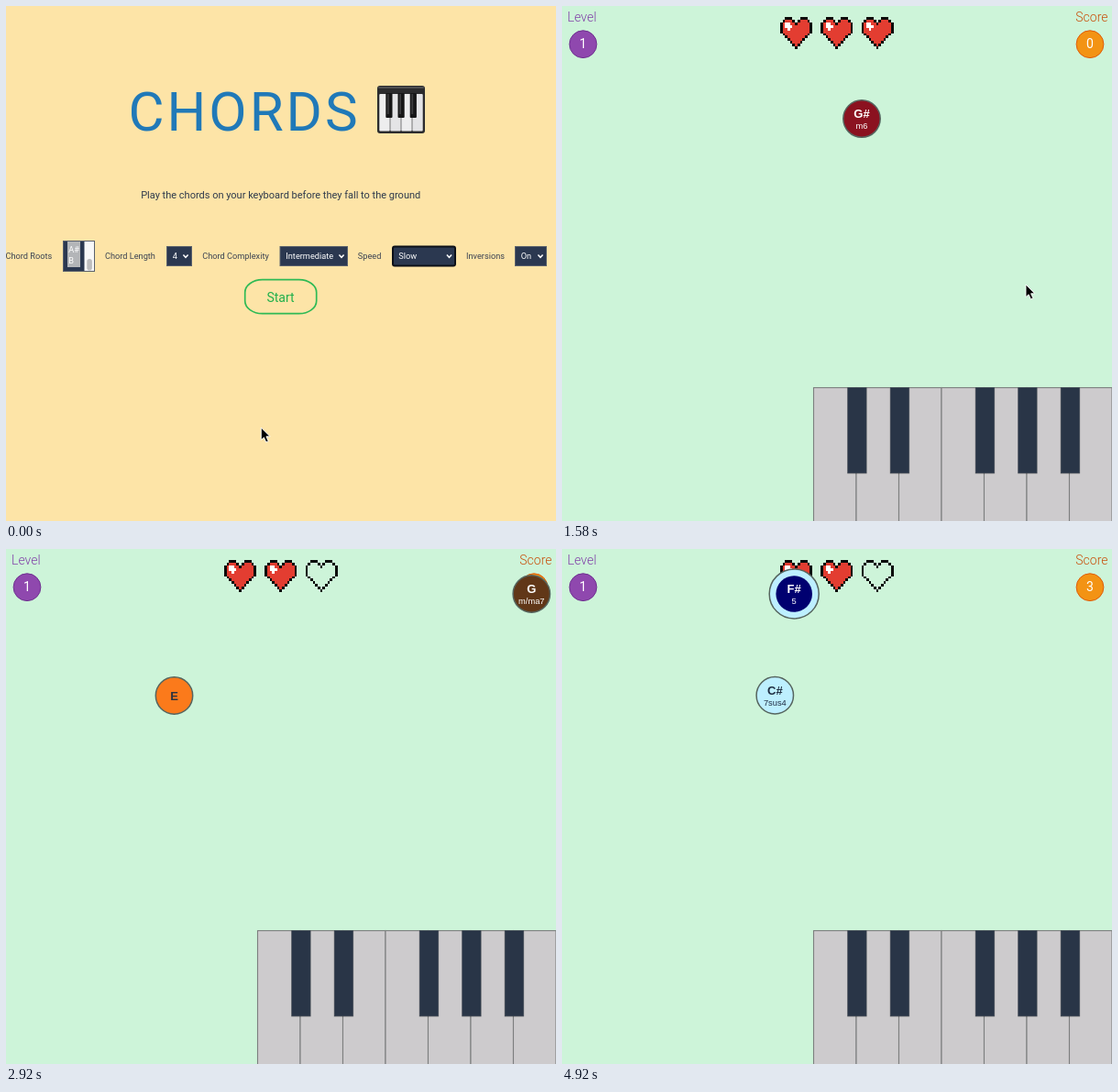
Animation, 600 px wide and 562 px high, one loop 5010 ms. Source, as an HTML page:

```html
<!DOCTYPE html>
<html lang="en">
<head>
<meta charset="utf-8">
<title>Chords</title>
<style>
  html, body { margin: 0; width: 100%; height: 100%; overflow: hidden; background: #cdf4d9; }
  svg { display: block; width: 100vw; height: 100vh; font-family: Roboto, sans-serif; }
  .mid { text-anchor: middle; }
  .label { font-size: 9.2px; fill: #3b4352; }
  .opt { font-size: 9.2px; fill: #fff; }
  .thin { font-weight: 300; }
  .ball { font-family: "Liberation Sans", Arial, sans-serif; text-anchor: middle; }
</style>
</head>
<body>
<svg id="stage" viewBox="0 0 600 562" preserveAspectRatio="none"></svg>
<script>
const LOOP = 5010, FRAME = 1000 / 12, LAST = 59;
const START = 660, SPEED = 0.1103, SPAWN_Y = 21;
const NS = 'http://www.w3.org/2000/svg';
const stage = document.getElementById('stage');

function el(parent, tag, attrs = {}, text) {
  const node = document.createElementNS(NS, tag);
  for (const k in attrs) node.setAttribute(k, attrs[k]);
  if (text !== undefined) node.textContent = text;
  parent.appendChild(node);
  return node;
}
const group = (parent, attrs) => el(parent, 'g', attrs);
const rect = (parent, x, y, width, height, fill, more) =>
  el(parent, 'rect', { x, y, width, height, fill, ...more });
const text = (parent, x, y, str, attrs) => el(parent, 'text', { x, y, ...attrs }, str);
const show = (node, on) => node.setAttribute('display', on ? 'inline' : 'none');

// ---- menu ----
const menu = group(stage);

function pianoIcon(p) {
  rect(p, 405, 87, 52, 52, '#2b2b2d', { rx: 3 });
  rect(p, 406, 88, 50, 2, '#4c4d50', { rx: 1 });
  for (let i = 0; i < 4; i++) rect(p, 407.3 + i * 12, 96, 11.4, 40.5, i % 2 ? '#e4e4e6' : '#ededee', { rx: 1 });
  for (let i = 0; i < 3; i++) {
    rect(p, 414.3 + i * 13.2, 95, 7.2, 27, '#161617', { rx: 1 });
    rect(p, 415.8 + i * 13.2, 96, 2, 22, '#3a3a3c');
  }
}

function select(x, w, value, focus) {
  rect(menu, x, 262.5, w, 21, '#2b3850', focus
    ? { rx: 2, stroke: '#0c1018', 'stroke-width': 2 }
    : { stroke: '#59606c', 'stroke-width': 1 });
  text(menu, x + 6.3, 276.3, value, { class: 'opt' });
  const cx = x + w - 6.5;
  el(menu, 'path', { d: `M${cx - 2.6} 271.6l2.6 2.7 2.6-2.7`, fill: 'none', stroke: '#fff', 'stroke-width': 1.5 });
}

function buildMenu() {
  rect(menu, 0, 0, 600, 562, '#fde4a7');
  text(menu, 133.5, 136.3, 'CHORDS', { fill: '#2079b8', 'font-size': 60, 'letter-spacing': 3 });
  pianoIcon(menu);
  text(menu, 299.7, 210, 'Play the chords on your keyboard before they fall to the ground',
    { class: 'mid', 'font-size': 11, fill: '#2f3a4c' });
  [[-0.5, 'Chord Roots'], [108, 'Chord Length'], [214.3, 'Chord Complexity'], [383.8, 'Speed'], [502, 'Inversions']]
    .forEach(([x, s]) => text(menu, x, 275.8, s, { class: 'label' }));

  // multiple-choice list with a scrollbar
  rect(menu, 62.5, 256.5, 34, 33, '#2b3850', { stroke: '#59606c' });
  rect(menu, 67, 257, 14, 28, '#b3b5b8');
  text(menu, 68.2, 268.6, 'A#', { class: 'opt' });
  text(menu, 68.2, 281.4, 'B', { class: 'opt' });
  rect(menu, 85.5, 257, 10.5, 32, '#f8f8f8');
  rect(menu, 88.3, 276, 5.6, 12.5, '#bdbdbe', { rx: 2.8 });

  select(175.5, 27, '4');
  select(299, 73.5, 'Intermediate');
  select(422, 68, 'Slow', true);
  select(555.5, 34, 'On');
  rect(menu, 260.7, 298.7, 78, 37, 'none', { rx: 19, ry: 14, stroke: '#2fba55', 'stroke-width': 1.7 });
  text(menu, 299.5, 323, 'Start', { class: 'mid', 'font-size': 14, fill: '#21b04b' });
}

// ---- game ----
const game = group(stage);
rect(game, 0, 0, 600, 562, '#cdf4d9');

function badge(label, tx, anchor, cx, color, edge, ink) {
  text(game, tx, 17, label, { class: 'thin', 'font-size': 14, fill: ink, 'text-anchor': anchor });
  el(game, 'circle', { cx, cy: 41.7, r: 14.9, fill: color, stroke: edge, 'stroke-width': 1 });
  return text(game, cx, 46.3, '', { class: 'mid', 'font-size': 14, fill: '#fff' });
}
badge('Level', 6, 'start', 23, '#8f48ae', '#6f3190', '#8140a8').textContent = '1';
const score = badge('Score', 595.5, 'end', 576, '#f39314', '#df5c0a', '#c8500c');

// Pixel heart: inner span of each row from its middle column, mirrored.
const CW = 35 / 13, CH = 35 / 12;
function heart(x) {
  const g = group(game, { transform: `translate(${x} 12) scale(${CW} ${CH})`, 'shape-rendering': 'crispEdges' });
  const cells = list => list.map(([c, r, w = 1]) => `M${c} ${r}h${w}v1h${-w}z`).join('');
  const body = [[2, 1, 3], [8, 1, 3], [1, 2, 5], [7, 2, 5]];
  const line = [[2, 0, 3], [8, 0, 3], [1, 1], [5, 1], [7, 1], [11, 1], [0, 2], [6, 2], [12, 2]];
  for (let r = 3; r < 12; r++) {
    const c = Math.max(0, r - 5);
    line.push([c, r], [12 - c, r]);
    if (c < 6) body.push([c + 1, r, 11 - 2 * c]);
  }
  const fill = group(g);
  el(fill, 'path', { d: cells(body), fill: '#e33d31' });
  el(fill, 'path', { d: cells([[2, 2, 2], [2, 3, 3], [3, 4]]), fill: '#fff' });
  el(g, 'path', { d: cells(line), fill: '#0a0a0a' });
  return fill;
}
const hearts = [238, 282.3, 326.5].map(heart);

const COLORS = {
  'C#': '#bdefff', D: '#3cd24a', 'D#': '#ffe416', E: '#fb7a1b', F: '#169c94', 'F#': '#000070',
  G: '#613718', 'G#': '#8b1220', 'A#': '#4f9aff', B: '#ae1ef2'
};
const WHITE = '#cdcbcd', BLACK = '#293547', KEY_W = 46.5, KEY_X = 274.5;
const keys = {};
[...'CDEFGAB'].forEach((n, i) => {
  keys[n] = rect(game, KEY_X + i * KEY_W, 416.5, KEY_W, 150, WHITE, { stroke: '#7d7f7f', 'stroke-width': 1.1 });
});
[['C#', 1], ['D#', 2], ['F#', 4], ['G#', 5], ['A#', 6]].forEach(([n, i]) => {
  const x = KEY_X + i * KEY_W - 9.2;
  rect(game, x - 0.8, 416.5, 21.8, 94.2, '#000', { opacity: 0.22, rx: 1 });
  keys[n] = rect(game, x, 416.5, 20.2, 93.2, BLACK, { stroke: '#3a4450', 'stroke-width': 0.6 });
});

const caption = text(game, 3.3, 556, '', { class: 'thin', 'font-size': 21.6, fill: '#c8500c' });

// root, quality, x, spawn time, end time, ink, bass note for the ring
const balls = [
  ['G#', 'm6', 327, 658, 2580, '#fff'],
  ['E', '', 183.5, 1657, 3245, '#2d3440'],
  ['G', 'm/ma7', 573.3, 2663, 3830, '#fff'],
  ['C#', '7sus4', 232.3, 3659, LOOP, '#1f2d42'],
  ['F#', '5', 253.2, 4663, LOOP, '#fff', 'C#']
].map(([root, kind, x, from, to, ink, bass]) => {
  const g = group(game, { class: 'ball', fill: ink });
  const edge = { stroke: '#56655f', 'stroke-width': 1.5 };
  if (bass) el(g, 'circle', { r: 27, fill: COLORS[bass], ...edge });
  el(g, 'circle', { r: bass ? 19.8 : 20.2, fill: COLORS[root], ...(bass ? {} : edge) });
  text(g, 0, kind ? -1 : 4.6, root, { 'font-size': 13, 'font-weight': 700 });
  text(g, 0, 10.8, kind, { 'font-size': 9.3 });
  return { g, x, from, to };
});

// press, recognised, release
const chords = [
  { notes: ['G#', 'B', 'D#', 'F#'], name: 'G#m7', on: 1990, hit: 2075, off: 2330 },
  { notes: ['G#', 'B', 'D#', 'F'], name: 'G#m6', on: 2495, hit: 2580, off: 2830 },
  { notes: ['E', 'G#', 'B'], name: 'E', on: 3160, hit: 3245, off: 3490 },
  { notes: ['G', 'A#', 'D', 'F#'], name: 'Gm/ma7', on: 3745, hit: 3830, off: 4080 }
];

// ---- pointer ----
const cursor = el(stage, 'path', {
  d: 'M0 0V13.6L3.1 10.8L5.4 16L7.9 14.9L5.6 9.8H9.8Z',
  fill: '#000', stroke: '#fff', 'stroke-width': 0.9, 'stroke-linejoin': 'round'
});
const PATH = [[0, 278.3, 460], [80, 278.3, 460], [500, 300, 319], [600, 300, 319], [900, 506, 304]];

function pointerAt(t) {
  let i = 0;
  while (i < PATH.length - 2 && t > PATH[i + 1][0]) i++;
  const [a, b] = [PATH[i], PATH[i + 1]];
  const u = Math.min(1, (t - a[0]) / (b[0] - a[0]));
  const e = u * u * (3 - 2 * u);
  return [a[1] + (b[1] - a[1]) * e, a[2] + (b[2] - a[2]) * e];
}

function render(t) {
  const playing = t >= START;
  show(menu, !playing);
  show(game, playing);
  show(cursor, t < chords[0].on);
  cursor.setAttribute('transform', `translate(${pointerAt(t)})`);

  const now = chords.find(c => t >= c.on && t < c.off);
  for (const n in keys) {
    const rest = n.length > 1 ? BLACK : WHITE;
    keys[n].setAttribute('fill', now && now.notes.includes(n) ? COLORS[n] : rest);
  }
  caption.textContent = now && t >= now.hit ? now.name : '';
  score.textContent = chords.slice(1).filter(c => t >= c.hit).length;
  show(hearts[2], t < chords[0].hit);

  for (const b of balls) {
    show(b.g, t >= b.from && t < b.to);
    b.g.setAttribute('transform', `translate(${b.x} ${SPAWN_Y + SPEED * (t - b.from)})`);
  }
}

buildMenu();
const begin = performance.now();
function tick() {
  const t = (performance.now() - begin) % LOOP;
  // stepped at twelve pictures a second
  render(Math.min(LAST, Math.floor((t + 4) / FRAME)) * FRAME);
  requestAnimationFrame(tick);
}
tick();
</script>
</body>
</html>
```
